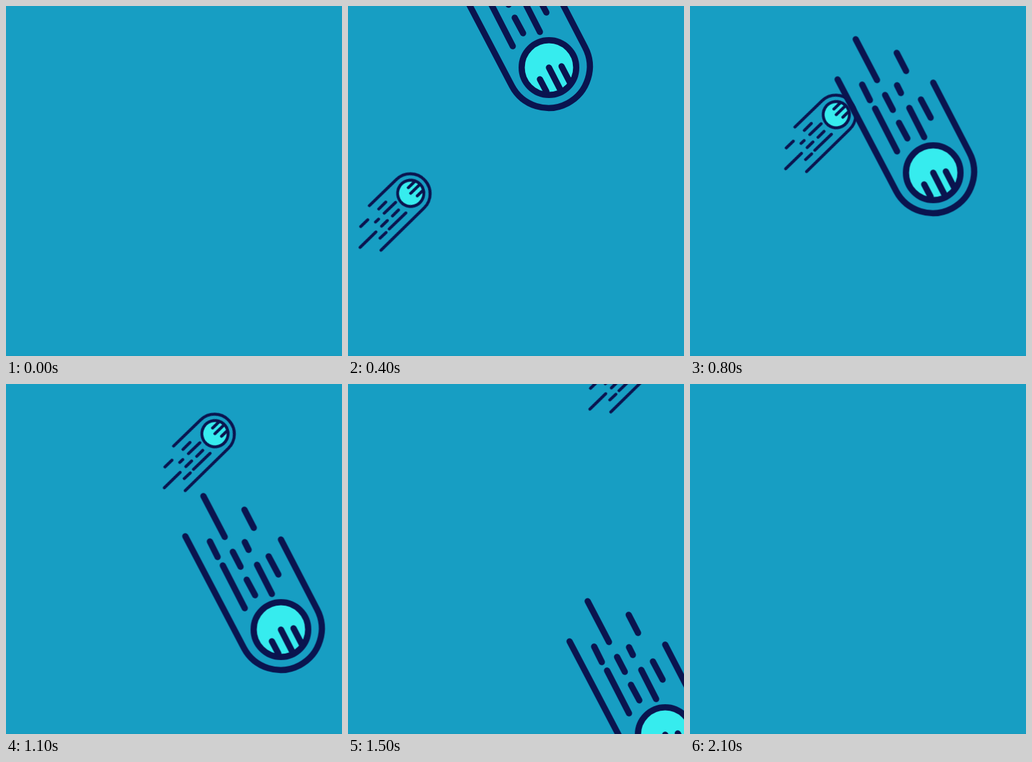
Animation, 520 px wide and 540 px high, one loop 3100 ms. Source, as an HTML page:

```html
<!DOCTYPE html>
<html lang="en">
<head>
<meta charset="utf-8">
<title>Meteors</title>
<style>
  html, body { margin: 0; width: 100%; height: 100%; overflow: hidden; background: #179ec3; }
  svg { display: block; width: 520px; height: 540px; }
  .meteor { opacity: 0; }
  #shape { fill: none; stroke: #0a144f; stroke-width: 9.6; stroke-linecap: round; }
</style>
</head>
<body>
<svg viewBox="0 0 520 540">
  <defs>
    <!-- The origin is the centre of the ball. -->
    <g id="shape">
      <path d="M-148-144L-57.4 28.2A64 64 0 0 0 55.8-31.6L0-139"/>
      <path d="M-120-206L-87-143M-56.5-185L-42-157M-110-136L-98-112M-56-135L-50-123
               M-74.5-120L-62.5-97M-90-99L-56-33M-19-113L-4-85M-37-100L-14-55M-53-77L-40-53"/>
      <circle r="42.2" fill="#36ecee"/>
      <path d="M-14 18L-4 37M0 0L18 35M19.5-2L33 24"/>
    </g>
  </defs>
  <rect y="539" width="520" height="1" fill="#1799bd"/>
  <g class="meteor" id="small"><use href="#shape" transform="rotate(-106.6) scale(.48)"/></g>
  <g class="meteor" id="big"><use href="#shape"/></g>
</svg>
<script>
  const STEPS = 31;
  const timing = { duration: 3100, iterations: Infinity };

  // Moves by (dx, dy) every 100 ms; hidden during the first step.
  function fly(id, x, y, dx, dy) {
    const meteor = document.getElementById(id);
    const at = n => ({ transform: `translate(${x + n * dx}px, ${y + n * dy}px)` });
    meteor.animate([at(0), at(STEPS)], { ...timing, easing: `steps(${STEPS}, end)` });
    meteor.animate([
      { opacity: 0, offset: 0 },
      { opacity: 0, offset: 1 / STEPS },
      { opacity: 1, offset: 1 / STEPS },
      { opacity: 1, offset: 1 }
    ], timing);
  }

  fly('small', -32.3, 410.3, 32.33, -30.33);
  fly('big', 245.6, -67.2, 16.35, 40.55);
</script>
</body>
</html>
```
